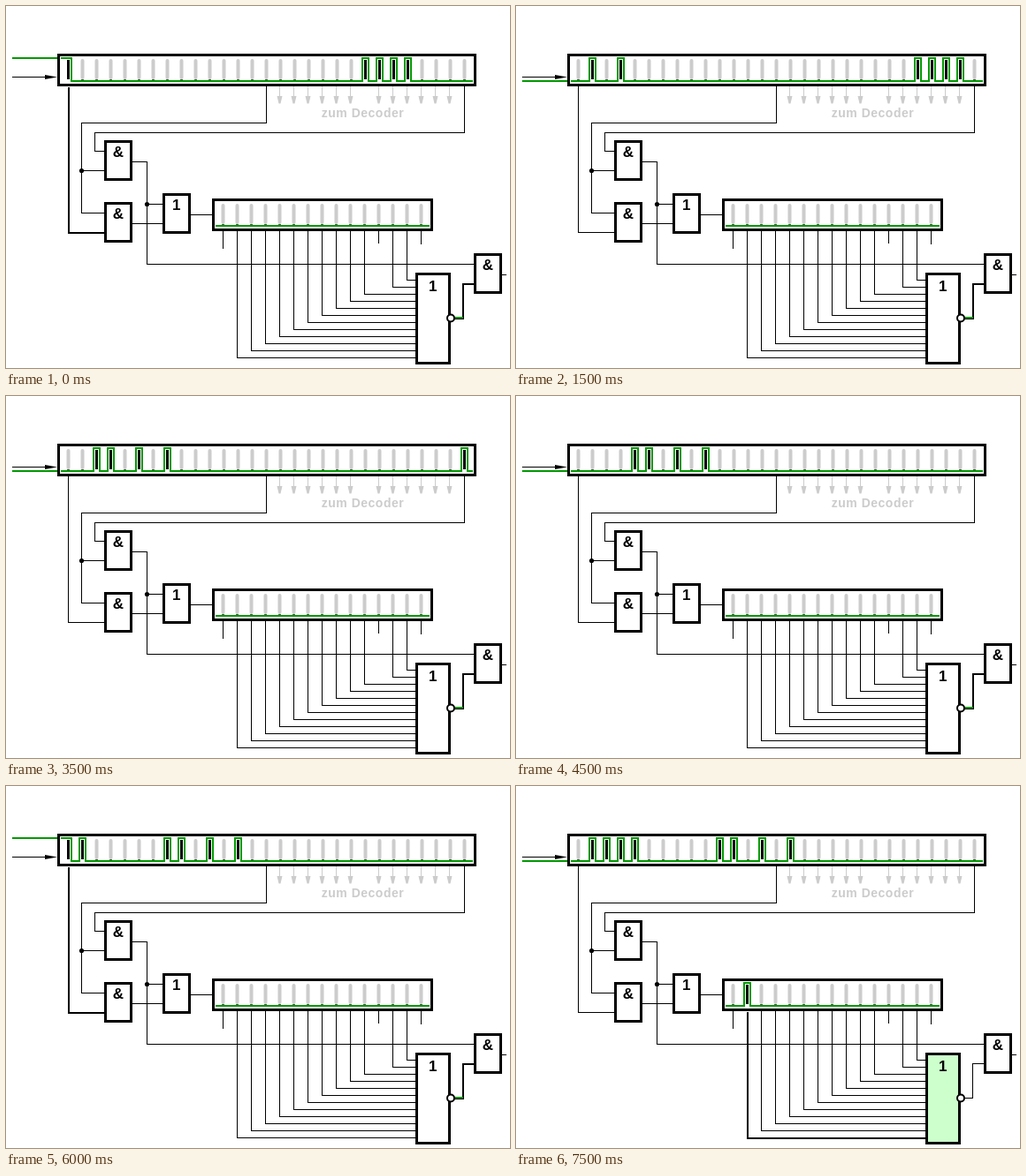
An HTML page that plays this animation: 570x410 px, repeating every 8 s.

```html
<!DOCTYPE html>
<html lang="de">
<head>
<meta charset="utf-8">
<title>Schieberegister</title>
<style>
html, body { margin: 0; width: 100%; height: 100%; overflow: hidden; background: #fff; }
svg { display: block; width: 570px; height: 410px; }
path, rect { shape-rendering: crispEdges; }
text { font: bold 17px "Liberation Sans", Arial, sans-serif; text-anchor: middle; }
.wire { fill: none; stroke: #000; stroke-width: 1; }
.wire.on { stroke-width: 2; transform: translate(.5px, .5px); }
.box { fill: none; stroke: #000; stroke-width: 3; }
.gate { fill: #fff; }
.gate.on { fill: #cfc; }
.signal { fill: none; stroke: #090; stroke-width: 2; visibility: hidden; }
.signal.on { visibility: visible; }
.cell .bar { fill: #ccc; shape-rendering: auto; }
.cell .foot { fill: #555; }
.cell .bit { fill: #000; visibility: hidden; }
.cell.on .bit { visibility: visible; }
.cell.on .bar, .cell.on .foot { visibility: hidden; }
.tap { stroke: #ccc; fill: none; }
.tip { fill: #ccc; shape-rendering: auto; }
</style>
</head>
<body>
<svg id="stage" viewBox="0 0 570 410"></svg>
<script>
const stage = document.getElementById('stage');
const STEP = 500, STEPS = 16;

function add(tag, attrs, parent = stage) {
  const el = document.createElementNS('http://www.w3.org/2000/svg', tag);
  for (const key in attrs) el.setAttribute(key, attrs[key]);
  return parent.appendChild(el);
}
const wire = d => add('path', { class: 'wire', d });
const signal = d => add('path', { class: 'signal', d });
const light = (els, on) => els.forEach(el => el.classList.toggle('on', on));

function label(x, y, str) {
  add('text', { x, y }).textContent = str;
}
function gate(x, y, height, str) {
  const width = height > 50 ? 37 : 29;
  const el = add('rect', { class: 'box gate', x, y, width, height });
  label(x + width / 2 - .2, y + (height > 50 ? 19 : 17), str);
  return el;
}

// A register with its cells; returns a function that shows a row of bits.
function register(dx, dy, count) {
  const g = add('g', { transform: `translate(${dx} ${dy})` });
  const end = 80 + 16 * (count - 1);
  const cells = [];
  for (let i = 0; i < count; i++) {
    const x = 70 + 16 * i;
    const cell = add('g', { class: 'cell' }, g);
    add('rect', { class: 'bar', x: x - 1.5, y: 60, width: 4, height: 23, rx: 2 }, cell);
    add('rect', { class: 'foot', x: x - 1, y: 83, width: 3, height: 1 }, cell);
    add('rect', { class: 'bit', x: x - 1, y: 61, width: 3, height: 22 }, cell);
    cells.push(cell);
  }
  const line = add('path', { class: 'signal on' }, g);
  add('rect', { class: 'box', x: 59.5, y: 55.5, width: end - 57.5, height: 34 }, g);
  return isOn => {
    let d = isOn(0) ? 'M62 59H74V85' : 'M62 85';
    cells.forEach((cell, i) => {
      const on = isOn(i), x = 70 + 16 * i;
      cell.classList.toggle('on', on);
      if (on && i) d += `H${x - 3}V59H${x + 4}V85`;
    });
    line.setAttribute('d', d + 'H' + end);
  };
}

// Taps to the decoder
for (let i = 15; i < 28; i++) {
  if (i === 21) continue;
  const x = 69.5 + 16 * i;
  add('path', { class: 'tap', d: `M${x} 91V104` });
  add('path', { class: 'tip', d: `M${x - 3} 102h6l-2 8.5h-2z` });
}
add('text', {
  x: 403.5, y: 126, fill: '#ccc', style: 'font-size:14px;letter-spacing:.5px'
}).textContent = 'zum Decoder';

// Wiring
wire('M7 80.5H48');
add('path', { d: 'M44 78L58 80.5L44 83z', style: 'shape-rendering:auto' });
const firstWire = wire('M70.5 91V256.5H112');
const midWire = wire('M294.5 91V132.5H85.5V234.5H112M85.5 186.5H112');
const midSignal = signal('M85 132V234H112');
wire('M518.5 91V143.5H100.5V164.5H112');
wire('M142 176.5H159.5V292.5H530M159.5 224.5H178');
const andOut = wire('M142 246.5H178');
const orOut = wire('M208 236.5H234');
wire('M560 304.5H566');
wire('M245.5 255V275M421.5 255V269M469.5 255V270');

const norInputs = [];
for (let k = 0; k < 12; k++) {
  const x = 261.5 + 16 * (k < 10 ? k : k + 1);
  norInputs.push(wire(`M${x} 255V${398.5 - 8 * k}H464`));
}
const norOut = wire('M506 353.5H516.5V314.5H530');
const norSignal = signal('M507 353H517');

for (const [cx, cy] of [[85.5, 186.5], [159.5, 224.5]]) add('circle', { cx, cy, r: 2.6 });

// Gates and registers
gate(112.5, 153.5, 43, '&');
const andGate = gate(112.5, 223.5, 43, '&');
const orGate = gate(178.5, 213.5, 43, '1');
gate(530.5, 281.5, 43, '&');
const norGate = gate(464.5, 303.5, 101, '1');
add('circle', { cx: 503, cy: 353.5, r: 4, fill: '#fff', stroke: '#000', 'stroke-width': 2 });

const inputLine = add('path', { class: 'signal on' });
const showMain = register(0, 0, 29);
const showSync = register(175, 164, 15);

// Steps at which a one is shifted in; step 10 only raises the line early.
const ones = [0, 2, 4, 5, 11, 12, 13, 14];

function show(step) {
  const high = step === 10 || ones.includes(step);
  const isOn = i => {
    if (i === 0) return high;
    const start = i - step;
    return start > 0 ? start >= 21 && start <= 24 : ones.includes(-start);
  };
  const match = high && isOn(14);
  const found = step === 15;

  inputLine.setAttribute('d', `M7 ${high ? 59 : 85}H58`);
  showMain(isOn);
  showSync(i => i === step - 14);
  light([firstWire], high);
  light([midWire, midSignal, andGate, andOut, orGate, orOut], match);
  light([norInputs[0], norGate], found);
  light([norOut, norSignal], !found);
}

let shown = -1;
function tick() {
  const step = Math.floor(performance.now() / STEP) % STEPS;
  if (step !== shown) show(shown = step);
  requestAnimationFrame(tick);
}
tick();
</script>
</body>
</html>
```
